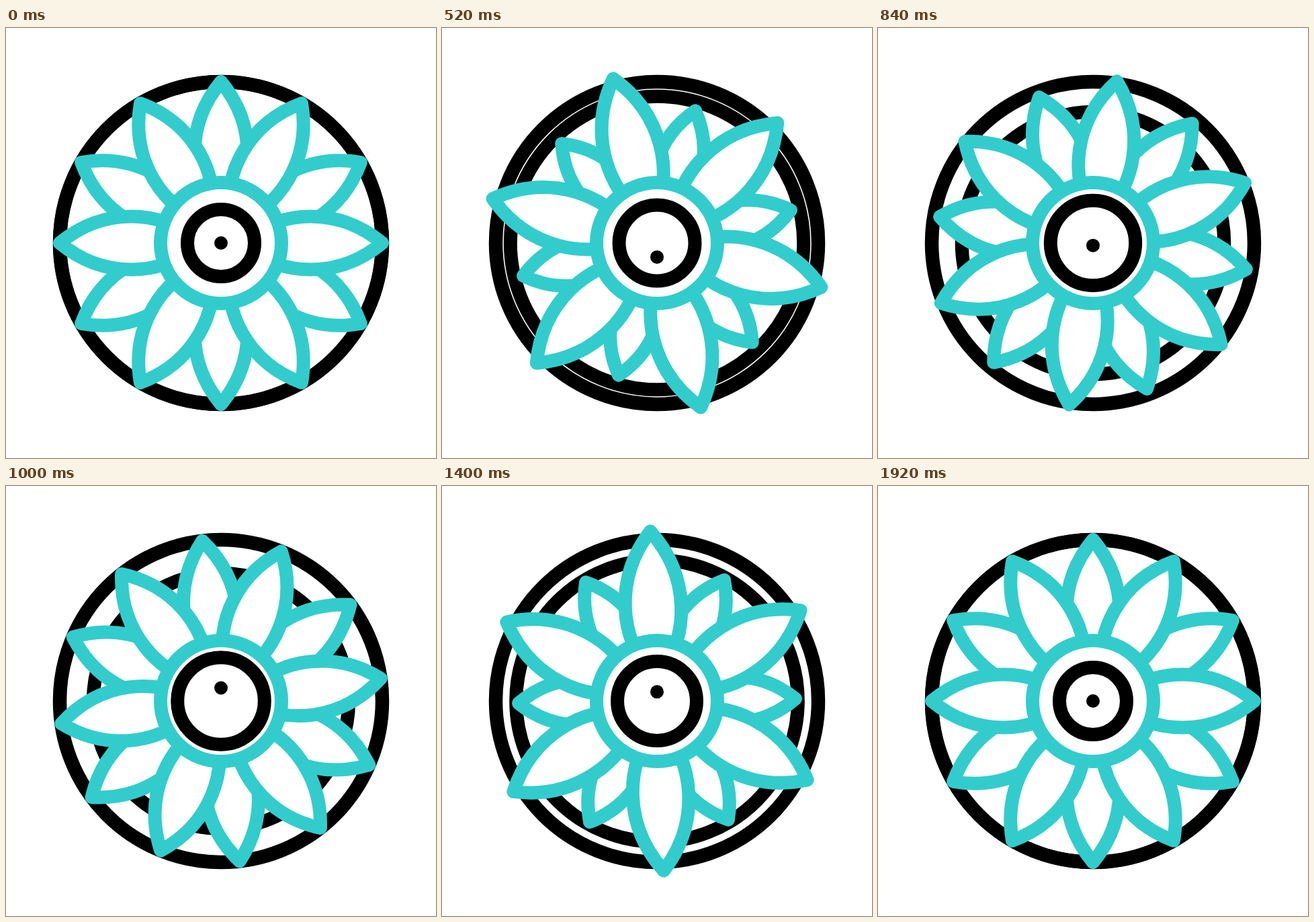
Animation, 640 px wide and 640 px high, one loop 2000 ms. Source, as an HTML page:

```html
<!DOCTYPE html>
<html lang="en">
<head>
<meta charset="utf-8">
<title>Flower mandala</title>
<style>
  html, body { margin: 0; width: 100%; height: 100%; overflow: hidden; background: #fff; }
  svg { display: block; width: 100vw; height: 100vh; }
  circle, path { stroke-width: 20; stroke-linejoin: round; }
  .ink { fill: none; stroke: #000; }
  .teal { fill: #fff; stroke: #33cccc; }
</style>
</head>
<body>
<svg viewBox="-320 -320 640 640">
  <circle class="ink" r="240" style="stroke-width:20.5"/>
  <circle class="ink" id="ring" r="240"/>
  <g id="back"></g>
  <g id="front"></g>
  <circle class="teal" r="90"/>
  <circle class="ink" id="iris" r="50"/>
  <circle id="dot" r="10"/>
</svg>
<script>
const LOOP = 2000, STEP = 40;
const $ = id => document.getElementById(id);

// Half outline of a petal pointing right, from tip to base; the other half mirrors it.
const HALF = [[240, 0], [207, 27.5], [170, 39.6], [133, 39.6], [112, 39.6], [98, 36.5], [82, 31]];

function petalPath(scale) {
  const side = sign => HALF.map(([x, y]) => `${(x * scale).toFixed(2)} ${(y * scale * sign).toFixed(2)}`);
  const down = side(1), up = side(-1).reverse();
  return `M${down[0]}C${down.slice(1)}L${up[0]}C${up.slice(1)}Z`;
}

function makePetals(group, firstAngle) {
  return Array.from({ length: 6 }, (_, i) => {
    const path = document.createElementNS("http://www.w3.org/2000/svg", "path");
    path.setAttribute("class", "teal");
    path.setAttribute("transform", `rotate(${firstAngle + i * 60})`);
    group.append(path);
    return path;
  });
}

const smooth = x => x * x * (3 - 2 * x);

// Eased interpolation through [time, value] keys.
function keyed(t, keys) {
  if (t <= keys[0][0]) return keys[0][1];
  for (let i = 1; i < keys.length; i++) {
    const [t0, a] = keys[i - 1], [t1, b] = keys[i];
    if (t <= t1) return a + (b - a) * smooth((t - t0) / (t1 - t0));
  }
  return keys[keys.length - 1][1];
}

// Cubic bezier easing with control points (x1, 0) and (x2, 1).
function bezierEase(x, x1, x2) {
  if (x <= 0) return 0;
  if (x >= 1) return 1;
  let lo = 0, hi = 1;
  for (let i = 0; i < 30; i++) {
    const s = (lo + hi) / 2, r = 1 - s;
    const at = 3 * s * r * r * x1 + 3 * s * s * r * x2 + s * s * s;
    if (at < x) lo = s; else hi = s;
  }
  return smooth(lo);
}

const SPREAD = [[90, 0], [1030, 1], [1890, 0]];
const BOUNCE = [[95, 0], [655, 24.5], [1050, -21.5], [1905, 0]];
const PULSE = [[90, 0], [485, 0.97], [1010, 0], [1300, 1], [1905, 0]];
const LEAD = [[95, 0], [600, 1.2], [1000, 1.4], [1240, 0], [1600, 3.2], [1920, 0]];

const back = makePetals($("back"), 30);
const front = makePetals($("front"), 0);

function shape(petals, group, scale, angle) {
  const d = petalPath(scale);
  petals.forEach(p => p.setAttribute("d", d));
  group.setAttribute("transform", `rotate(${angle.toFixed(3)})`);
}

function draw(time) {
  const t = Math.floor((time % LOOP) / STEP) * STEP;
  const spread = keyed(t, SPREAD), pulse = keyed(t, PULSE);
  const angle = 120 * bezierEase((t - 100) / 1800, 0.32, 0.815);
  $("ring").setAttribute("r", 240 - 50 * spread);
  $("iris").setAttribute("r", 50 + 14.8 * spread);
  $("dot").setAttribute("cy", keyed(t, BOUNCE));
  shape(back, $("back"), 1 - 0.153 * pulse, angle + keyed(t, LEAD));
  shape(front, $("front"), 1 + 0.057 * pulse, angle);
}

const start = performance.now();
function tick() {
  draw(performance.now() - start);
  requestAnimationFrame(tick);
}
tick();
</script>
</body>
</html>
```
